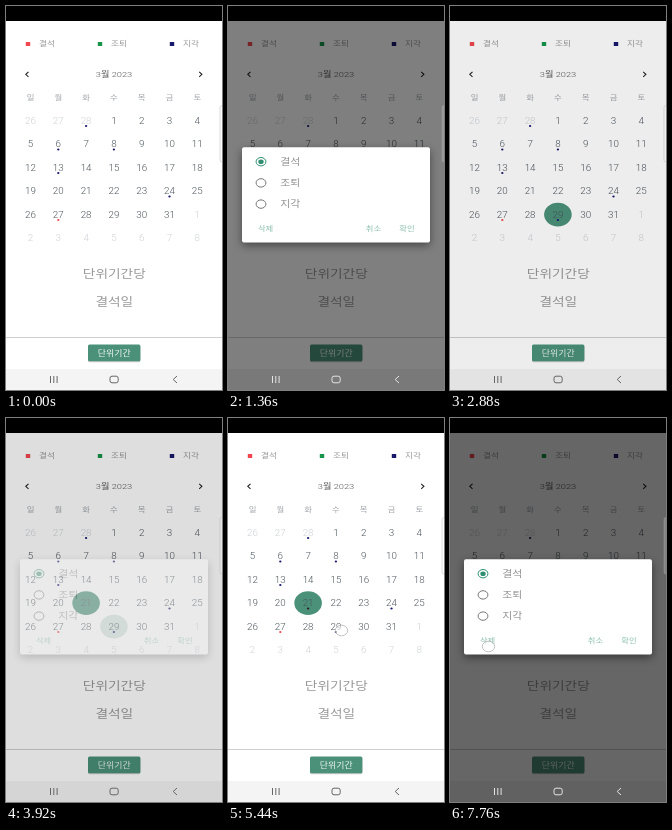
Animation of 216x384 px, one loop 8000 ms. Source, as an HTML page:

```html
<!DOCTYPE html>
<html lang="ko">
<head>
<meta charset="utf-8">
<title>출결 달력</title>
<style>
  html, body { margin: 0; width: 100%; height: 100%; overflow: hidden; background: #fff; }
  svg { display: block; width: 216px; height: 384px; }
  text { font-family: Roboto, "Noto Sans CJK KR", "Noto Sans CJK", sans-serif; font-weight: 300; text-anchor: middle; }
  .card { filter: drop-shadow(0 3px 4px rgba(0, 0, 0, 0.45)); }
</style>
</head>
<body>
<svg id="stage" viewBox="0 0 216 384"></svg>
<script>
const LOOP = 8000, STEP = 80;
const WIDE = 1.17;
const GREEN = '#4b917a', NAVY = '#17176c', RED = '#f0484e';
const stage = document.getElementById('stage');

function add(parent, tag, attrs = {}) {
  const node = document.createElementNS('http://www.w3.org/2000/svg', tag);
  for (const key in attrs) node.setAttribute(key, attrs[key]);
  parent.appendChild(node);
  return node;
}
const set = (node, key, value) => node.setAttribute(key, value);
const rect = (p, x, y, width, height, fill, more) => add(p, 'rect', { x, y, width, height, fill, ...more });
const oval = (p, cx, cy, r, attrs) => add(p, 'ellipse', { cx, cy, rx: r * WIDE, ry: r, ...attrs });
const line = (p, d, stroke, width) => add(p, 'path', { d, stroke, 'stroke-width': width, fill: 'none' });

function label(p, str, x, y, size, fill) {
  const lift = /[가-힣]/.test(str) ? 0.37 : 0.355;
  const node = add(p, 'text', {
    transform: `translate(${x} ${y + size * lift}) scale(${WIDE} 1)`,
    'font-size': size, fill
  });
  node.textContent = str;
  return node;
}

// Main screen
const page = add(stage, 'g');
rect(page, 0, 0, 216, 384, '#fff');
[['결석', 22, RED], ['조퇴', 94, '#16954a'], ['지각', 166, NAVY]].forEach(([name, x, color]) => {
  rect(page, x - 2.2, 36, 4.4, 4, color);
  label(page, name, x + 19, 37.7, 7.4, '#999');
});

label(page, '3월 2023', 108, 68, 7.9, '#555');
line(page, 'M22.5 65.8L19.8 68.3L22.5 70.8M193.2 65.8L195.9 68.3L193.2 70.8', '#222', 1.1);

const colX = c => 24.5 + c * 27.8;
const rowY = r => 114.6 + r * 23.5;
[...'일월화수목금토'].forEach((day, c) => label(page, day, colX(c), 91.3, 7.2, '#a0a5aa'));

// Day cells count from 26 February
const at = cell => [colX(cell % 7), rowY(Math.floor(cell / 7))];
function marker(cell, color) {
  const [x, y] = at(cell);
  return oval(page, x, y + 5.3, 1, { fill: color });
}
const circles = {};
[23, 31].forEach(cell => {
  const [x, y] = at(cell);
  circles[cell] = oval(page, x, y, 11.8, { fill: GREEN });
});
for (let cell = 0; cell < 42; cell++) {
  const [x, y] = at(cell);
  const inMonth = cell > 2 && cell < 34;
  const day = cell < 3 ? 26 + cell : inMonth ? cell - 2 : cell - 33;
  label(page, String(day), x, y, 8.4, inMonth ? '#4a545c' : '#ccd0d4');
}
[2, 8, 10, 15, 26].forEach(cell => marker(cell, NAVY));
marker(29, RED);
const lateDot = marker(31, NAVY);
const absentDot = marker(23, '#301818');

label(page, '단위기간당', 108.3, 267.3, 11.7, '#999');
label(page, '결석일', 108.3, 295.3, 11.7, '#999');
rect(page, 0, 331, 216, 1, '#cfcfcf');
rect(page, 82, 339.6, 52.4, 16.6, '#000', { rx: 1.5, opacity: 0.2 });
rect(page, 82, 338.6, 52.4, 16.6, GREEN, { rx: 1.5 });
label(page, '단위기간', 108.2, 346.7, 7.6, '#f4f8f6');

rect(page, 0, 363, 216, 21, '#f4f4f4');
const shade = rect(stage, 0, 15, 216, 369, '#000');
rect(stage, 0, 0, 216, 15, '#000');
const nav = add(stage, 'g', { fill: 'none', 'stroke-width': 1 });
add(nav, 'path', { d: 'M44.5 370V377M47.8 370V377M51.1 370V377M171 370L167.2 373.5L171 377' });
add(nav, 'rect', { x: 104, y: 370.2, width: 8.2, height: 6.6, rx: 2 });
rect(stage, 214, 99.5, 5, 56.5, '#fff', {
  rx: 2, 'fill-opacity': 0.2, stroke: '#aaa', 'stroke-opacity': 0.6, 'stroke-width': 0.7
});

// Dialog
const dialog = add(stage, 'g');
rect(dialog, 14, 141.3, 188, 95.2, '#fff', { rx: 2, class: 'card' });
const ripple = oval(dialog, 33, 198, 9, { fill: '#000' });
const radios = ['결석', '조퇴', '지각'].map((name, i) => {
  const y = 155.7 + i * 21.2;
  label(dialog, name, 62.3, y - 0.4, 9.3, '#929292');
  return {
    ring: oval(dialog, 33, y, 4.2, { fill: 'none', 'stroke-width': 1 }),
    core: oval(dialog, 33, y, 2.3, { fill: '#2f8f70' })
  };
});
[['삭제', 37.6], ['취소', 145.5], ['확인', 179]].forEach(([name, x]) =>
  label(dialog, name, x, 222, 7.1, '#8cbfaf'));

const touch = oval(stage, 0, 0, 5.3, { fill: '#fff', 'fill-opacity': 0.55, stroke: '#aaa', 'stroke-width': 0.7 });

// Start, end, x, y
const touches = [
  [480, 1120, 110.5, 205.5], [1760, 2160, 36, 199], [2480, 2800, 182, 219],
  [3440, 3840, 83, 184.5], [4880, 5040, 183.5, 218], [5440, 6960, 113.5, 212.5],
  [7760, 8000, 38.5, 228.5]
];
// Start, whether it opens
const fades = [[1120, 1], [2800, 0], [3920, 1], [5040, 0], [6960, 1]];
const curves = [
  { dim: [0.3, 0.07, 0.04, 0.02, 0.01, 0], box: [0.3, 0] },
  { dim: [0.13, 0.3, 0.42, 0.5, 0.6], box: [0.38, 0.75, 0.95, 1] }
];
const pick = (list, i) => list[Math.min(i, list.length - 1)];
const clamp = v => Math.max(0, Math.min(1, v));
const show = (node, on) => set(node, 'opacity', on ? 1 : 0);

function fadeState(t) {
  const fade = fades.filter(f => t >= f[0]).pop();
  if (!fade) return { dim: 0, box: 0 };
  const i = Math.floor((t - fade[0]) / STEP), curve = curves[fade[1]];
  return { dim: pick(curve.dim, i), box: pick(curve.box, i) };
}

function draw(time) {
  const t = Math.floor((time % LOOP) / STEP) * STEP;
  const { dim, box } = fadeState(t);
  set(shade, 'opacity', dim);
  set(dialog, 'opacity', box);
  set(nav, 'stroke', dim > 0.35 ? '#e4e4e4' : '#666');

  const first = t >= 1120 ? 1 - clamp((t - 3680) / 320) : 0;
  set(circles[31], 'opacity', t >= 6960 ? 1 : first);
  set(circles[23], 'opacity', t >= 3680 ? 1 - clamp((t - 6880) / 320) : 0);
  show(lateDot, t >= 2800);
  show(absentDot, t >= 5040);

  const chosen = t >= 2080 && t < 3200 ? 2 : 0;
  radios.forEach(({ ring, core }, i) => {
    set(ring, 'stroke', i === chosen ? '#2f8f70' : '#777');
    show(core, i === chosen);
  });
  const wave = (t - 2000) / 400;
  set(ripple, 'opacity', wave >= 0 && wave < 1 ? 0.12 * (1 - wave) : 0);

  const tap = touches.find(([from, to]) => t >= from && t < to);
  show(touch, tap);
  if (tap) {
    set(touch, 'cx', tap[2]);
    set(touch, 'cy', tap[3]);
  }
}

const begin = performance.now();
function tick() {
  draw(performance.now() - begin);
  requestAnimationFrame(tick);
}
tick();
</script>
</body>
</html>
```
